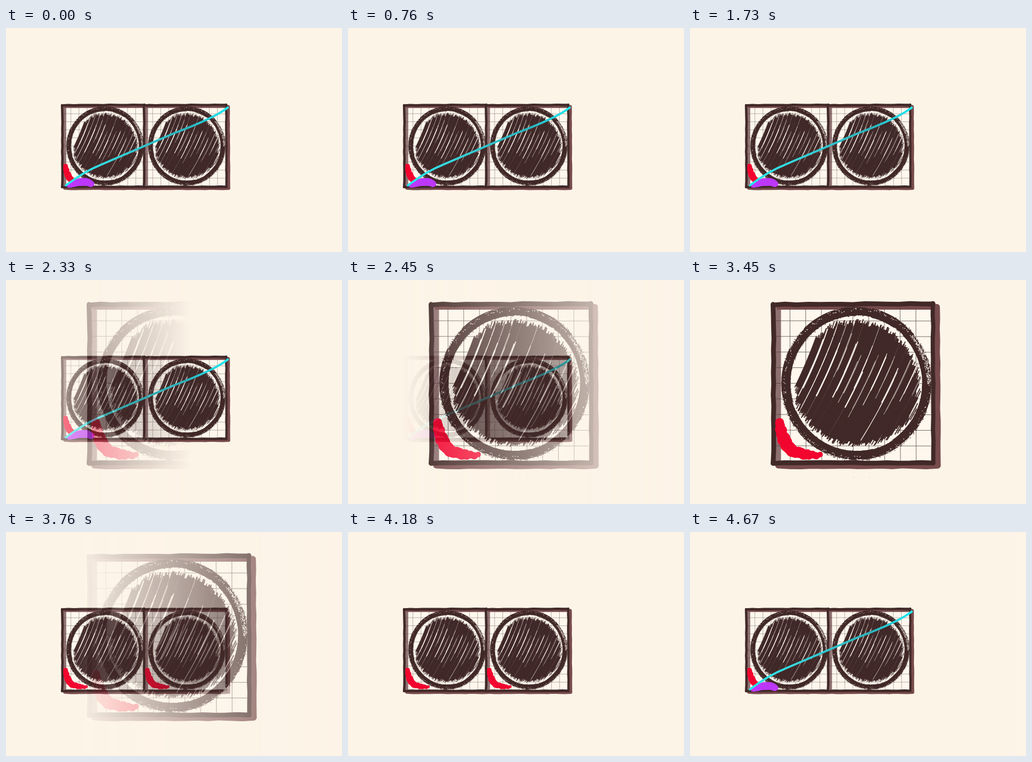
Write an HTML page with a canvas that moves like this. It is 600 px wide and 400 px high and loops after 4700 ms.

```html
<!DOCTYPE html>
<html lang="en">
<head>
<meta charset="utf-8">
<title>Tiles</title>
<style>
  html, body { margin: 0; width: 100%; height: 100%; overflow: hidden; background: #fdf4e8; }
  canvas { display: block; }
</style>
</head>
<body>
<canvas id="stage" width="600" height="400"></canvas>
<script>
const W = 600, H = 400, LOOP = 4700, WIPE = 500, FEATHER = 500;
const PAPER = '#fdf4e8', INK = '#412928', SHADE = '#774b4c', TILE = '#fdf7ed', RED = '#f2052f', PURPLE = '#bd38fb';

const CX = 297, CY = 184.5, RX = 125.5, RY = 128.5;
const SMALL = 0.515, STEP = 146;

function seeded(seed) {
  return () => (seed = (seed * 16807) % 2147483647) / 2147483647;
}

function layer() {
  const canvas = document.createElement('canvas');
  canvas.width = W;
  canvas.height = H;
  return canvas.getContext('2d');
}

function rough(c, rand, x0, y0, x1, y1, width, color) {
  const n = 14, wobble = () => (rand() - 0.5) * 1.8;
  c.lineWidth = width;
  c.strokeStyle = color;
  c.beginPath();
  for (let i = 0; i <= n; i++) {
    c.lineTo(x0 + (x1 - x0) * i / n + wobble(), y0 + (y1 - y0) * i / n + wobble());
  }
  c.stroke();
}

// Scalloped patch: circles along a quadratic curve, widest in the middle
function blob(c, [x0, y0], [x1, y1], [x2, y2], color, r0, r1, r2, jitter) {
  const rand = seeded(77), n = 26;
  const mix = (k, a, b, d) => (1 - k) * (1 - k) * a + 2 * k * (1 - k) * b + k * k * d;
  c.fillStyle = color;
  for (let i = 0; i <= n; i++) {
    const k = i / n, shift = () => (rand() - 0.5) * jitter;
    c.beginPath();
    c.arc(mix(k, x0, x1, x2) + shift(), mix(k, y0, y1, y2) + shift(), mix(k, r0, r1, r2), 0, Math.PI * 2);
    c.fill();
  }
}

function drawGrid(c) {
  c.strokeStyle = '#4c3c39cc';
  c.lineWidth = 0.9;
  c.beginPath();
  for (let i = 0; i < 9; i++) {
    const x = 178.5 + i * 28.1, y = 72.8 + i * 27.9;
    c.moveTo(x, 52);
    c.lineTo(x + 0.6, 323);
    c.moveTo(154, y);
    c.lineTo(430, y + 0.4);
  }
  c.stroke();
}

// One sweep of the scribble: a leaning curve kept inside a circle
function sweep(c, u, radius, width, top = 60, bottom = 310) {
  c.lineWidth = width;
  c.beginPath();
  for (let y = top; y < bottom; y += 2) {
    const v = y - 72, x = u - 0.32 * v - 0.0007 * v * v;
    if (Math.hypot(x - CX, y - CY) < radius) c.lineTo(x, y);
  }
  c.stroke();
}

function drawScribble(c, rand) {
  const first = 234.5, pitch = 15.5, count = 16;
  c.lineCap = 'butt';
  c.strokeStyle = INK;
  for (let i = 0; i < count; i++) {
    const u = first + pitch * (i + 0.5), radius = 108 + rand() * 7;
    sweep(c, u, radius - 4, 12.5);
    for (let j = 0; j < 13; j++) {
      sweep(c, u + (rand() - 0.5) * 16, radius + (rand() - 0.5) * 9, 1.7);
    }
  }
  c.strokeStyle = TILE;
  for (let i = 1; i < count; i++) {
    const width = (i % 2 ? 2.6 : 1.1) * (1 - i / 26);
    for (let j = 0; j < 3; j++) {
      const top = 70 + i * 5 + rand() * 60;
      sweep(c, first + pitch * i + (rand() - 0.5) * 2, 118, width * (0.5 + rand() * 0.6), top, top + 40 + rand() * 80);
    }
  }
}

function drawRing(c, rand) {
  const ring = (d, width) => {
    c.lineWidth = width;
    c.beginPath();
    c.ellipse(CX, CY, RX + d, RY + d, 0, 0, Math.PI * 2);
    c.stroke();
  };
  const dots = (count, color, center, spread, from = 0, span = Math.PI * 2) => {
    c.fillStyle = color;
    for (let i = 0; i < count; i++) {
      const a = from + rand() * span, s = 0.7 + rand() * 0.8;
      const d = center + (rand() + rand() - 1) * spread;
      c.fillRect(CX + Math.cos(a) * (RX + d), CY + Math.sin(a) * (RY + d), s, s);
    }
  };
  c.strokeStyle = INK;
  ring(0, 13.5);
  for (let i = 0; i < 14; i++) {
    c.setLineDash([20 + rand() * 90, 5 + rand() * 60, 10 + rand() * 50, 10 + rand() * 80]);
    ring((rand() - 0.5) * 16, 1.6);
  }
  c.setLineDash([]);
  dots(900, INK, 7, 3);
  dots(300, INK, -7, 2);
  dots(220, TILE, 4, 4);
  dots(260, TILE, 3, 5, -0.7, 0.7);
}

function drawTile(c) {
  const rand = seeded(4127);
  c.lineCap = c.lineJoin = 'round';
  c.fillStyle = TILE;
  c.fillRect(150, 45, 282, 280);
  c.fillStyle = '#8d7070';
  c.fillRect(152, 46, 10.5, 277);
  c.fillStyle = SHADE;
  c.fillRect(155, 46, 276, 7);
  drawGrid(c);
  drawScribble(c, rand);
  drawRing(c, rand);
  c.lineCap = 'round';
  rough(c, rand, 441, 48, 442, 331, 11, SHADE);
  rough(c, rand, 157, 332, 442, 332, 10.5, SHADE);
  rough(c, rand, 149, 44, 149, 327, 8.5, INK);
  rough(c, rand, 149, 44, 434, 42, 8.5, INK);
  rough(c, rand, 434, 42, 434, 326, 7.5, INK);
  rough(c, rand, 149, 327, 434, 326, 8.5, INK);
}

function drawCorner(c) {
  blob(c, [162, 256], [164, 318], [233, 313], RED, 8, 15, 5, 4);
}

function inSmall(c, index, draw) {
  c.save();
  c.translate(98 + index * STEP, 134);
  c.scale(SMALL, SMALL);
  c.translate(-144, -36);
  draw(c);
  c.restore();
}

function drawPair(c) {
  inSmall(c, 0, drawTile);
  inSmall(c, 1, drawTile);
}

function drawAngles(c) {
  c.save();
  c.beginPath();
  c.rect(98, 236, 27, 42);
  c.clip();
  inSmall(c, 0, drawCorner);
  c.restore();
  blob(c, [113, 282], [137, 269], [153, 279], PURPLE, 3.5, 9, 5, 1.5);

  const tint = c.createLinearGradient(107, 0, 396, 0);
  ['#25e8ee', '#36d8dd', '#2fc3ca', '#2bb4be', '#1feaf2'].forEach((color, i) => tint.addColorStop(i / 4, color));
  c.strokeStyle = tint;
  c.lineCap = 'round';
  c.lineWidth = 3.8;
  c.beginPath();
  c.moveTo(107, 281);
  c.quadraticCurveTo(140, 256, 170, 244);
  c.lineTo(300, 188);
  c.quadraticCurveTo(374, 160, 396, 142);
  c.stroke();
}

function scene(draw) {
  const c = layer();
  c.fillStyle = PAPER;
  c.fillRect(0, 0, W, H);
  draw(c);
  return c.canvas;
}

const angles = scene(c => {
  drawPair(c);
  drawAngles(c);
});

const single = scene(c => {
  drawTile(c);
  drawCorner(c);
  c.fillStyle = '#b5aaa2';
  c.fillRect(292, 352, 1, 1);
  c.fillRect(320, 352, 1, 1);
});

const pair = scene(c => {
  drawPair(c);
  inSmall(c, 0, drawCorner);
  inSmall(c, 1, drawCorner);
});

const CUTS = [
  { at: 2180, to: single },
  { at: 3480, to: pair },
  { at: 4190, to: angles }
];

const stage = document.getElementById('stage').getContext('2d');
const veil = layer();

// Wide soft-edged wipe from the left
function wipe(image, p) {
  const front = p * (W + FEATHER);
  const mask = veil.createLinearGradient(front - FEATHER, 0, front, 0);
  mask.addColorStop(0, '#000f');
  mask.addColorStop(1, '#0000');
  veil.globalCompositeOperation = 'copy';
  veil.drawImage(image, 0, 0);
  veil.globalCompositeOperation = 'destination-in';
  veil.fillStyle = mask;
  veil.fillRect(0, 0, W, H);
  stage.drawImage(veil.canvas, 0, 0);
}

function render(now) {
  const t = now % LOOP;
  let base = angles, active = null;
  for (const cut of CUTS) {
    if (t >= cut.at + WIPE) base = cut.to;
    else if (t >= cut.at) active = cut;
  }
  stage.drawImage(base, 0, 0);
  if (active) wipe(active.to, (t - active.at) / WIPE);
}

function tick() {
  render(performance.now());
  requestAnimationFrame(tick);
}
tick();
</script>
</body>
</html>
```
